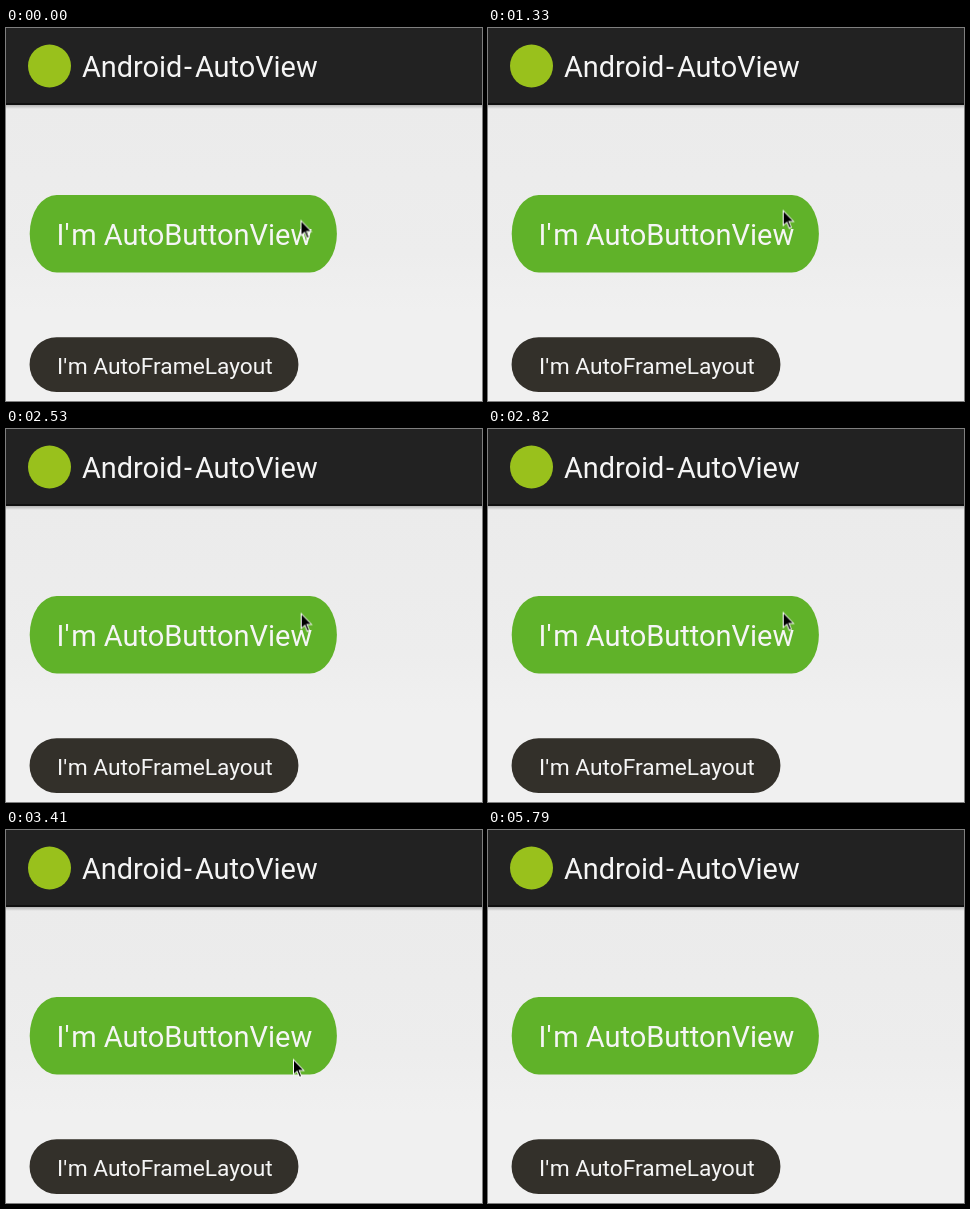
Write an HTML page that moves like this. It is 476 px wide and 373 px high and loops after 6.45 s.

```html
<!DOCTYPE html>
<html lang="en">
<head>
<meta charset="utf-8">
<title>Android-AutoView</title>
<style>
  html, body { margin: 0; width: 100%; height: 100%; overflow: hidden; }
  svg { display: block; width: 476px; height: 373px; }
  text { font-family: Roboto, "Noto Sans", sans-serif; fill: #f5f5f5; }

  .button { animation: press 6450ms step-end infinite; }
  .cursor { animation: move 6450ms step-end infinite; }

  /* two clicks on the green button */
  @keyframes press {
    0%       { fill: #60b229; }
    29.9225% { fill: #4b8e22; }
    39.2248% { fill: #60b229; }
    46.0465% { fill: #4b8e22; }
    52.8682% { fill: #60b229; }
    100%     { fill: #60b229; }
  }

  @keyframes move {
    0%       { transform: translate(294.5px, 191.5px); }
    6.8217%  { transform: translate(294.5px, 188.5px); }
    11.4729% { transform: translate(294.5px, 184.5px); }
    13.7984% { transform: translate(294.7px, 182.5px); }
    20.6202% { transform: translate(294.7px, 181.5px); }
    39.2248% { transform: translate(294.7px, 183.5px); }
    43.7209% { transform: translate(294.7px, 182.5px); }
    52.8682% { transform: translate(287px, 228.5px); }
    55.1938% { transform: translate(261px, 307.5px); }
    59.8450% { transform: translate(261px, 312px); }
    62.1705% { transform: translate(261px, 312.5px); }
    71.3178% { transform: translate(264px, 315.5px); }
    75.9690% { transform: translate(264px, 316px); }
    85.1163% { transform: translate(288px, 320.5px); }
    87.4419% { transform: translate(384.3px, 361.5px); }
    89.7674%, 100% { transform: translate(500px, 400px); }
  }
</style>
</head>
<body>
<svg viewBox="0 0 476 373">
  <defs>
    <linearGradient id="page" x1="0" y1="0" x2="0" y2="1">
      <stop offset="0" stop-color="#ebebeb"/>
      <stop offset=".5" stop-color="#ededed"/>
      <stop offset=".7" stop-color="#f0f0f0"/>
      <stop offset="1" stop-color="#f0f0f0"/>
    </linearGradient>
    <linearGradient id="shade" x1="0" y1="0" x2="0" y2="1">
      <stop offset="0" stop-color="#a8a8a8"/>
      <stop offset="1" stop-color="#ebebeb"/>
    </linearGradient>
  </defs>

  <rect y="76" width="476" height="297" fill="url(#page)"/>
  <rect y="76" width="476" height="5" fill="url(#shade)"/>
  <rect width="476" height="76" fill="#222"/>
  <rect y="75" width="476" height="2" fill="#111"/>

  <circle cx="43.5" cy="38" r="21.5" fill="#99c11c"/>
  <text x="76" y="49" font-size="28.9">Android<tspan dx="1.5">-</tspan><tspan dx="3">AutoView</tspan></text>

  <rect class="button" x="23.7" y="167" width="307.2" height="77.4" rx="27" ry="38.7" fill="#60b229"/>
  <text x="50.5" y="217" dx="0 0 2" font-size="29">I'm AutoButtonView</text>

  <rect x="23.6" y="309.2" width="268.8" height="54.8" rx="27" fill="#33302a"/>
  <text x="51" y="346" dx="0 0 .8" font-size="22.75">I'm AutoFrameLayout</text>

  <g class="cursor">
    <path fill="#fff" d="M0 0V17L3.8 13.6L6.2 19.4L9.2 18.2L6.9 12.4H11.9Z"/>
    <path d="M1 2.2V14.9L4.2 12.1L6.8 18.1L8 17.6L5.5 11.5H9.9Z"/>
  </g>
</svg>
</body>
</html>
```
